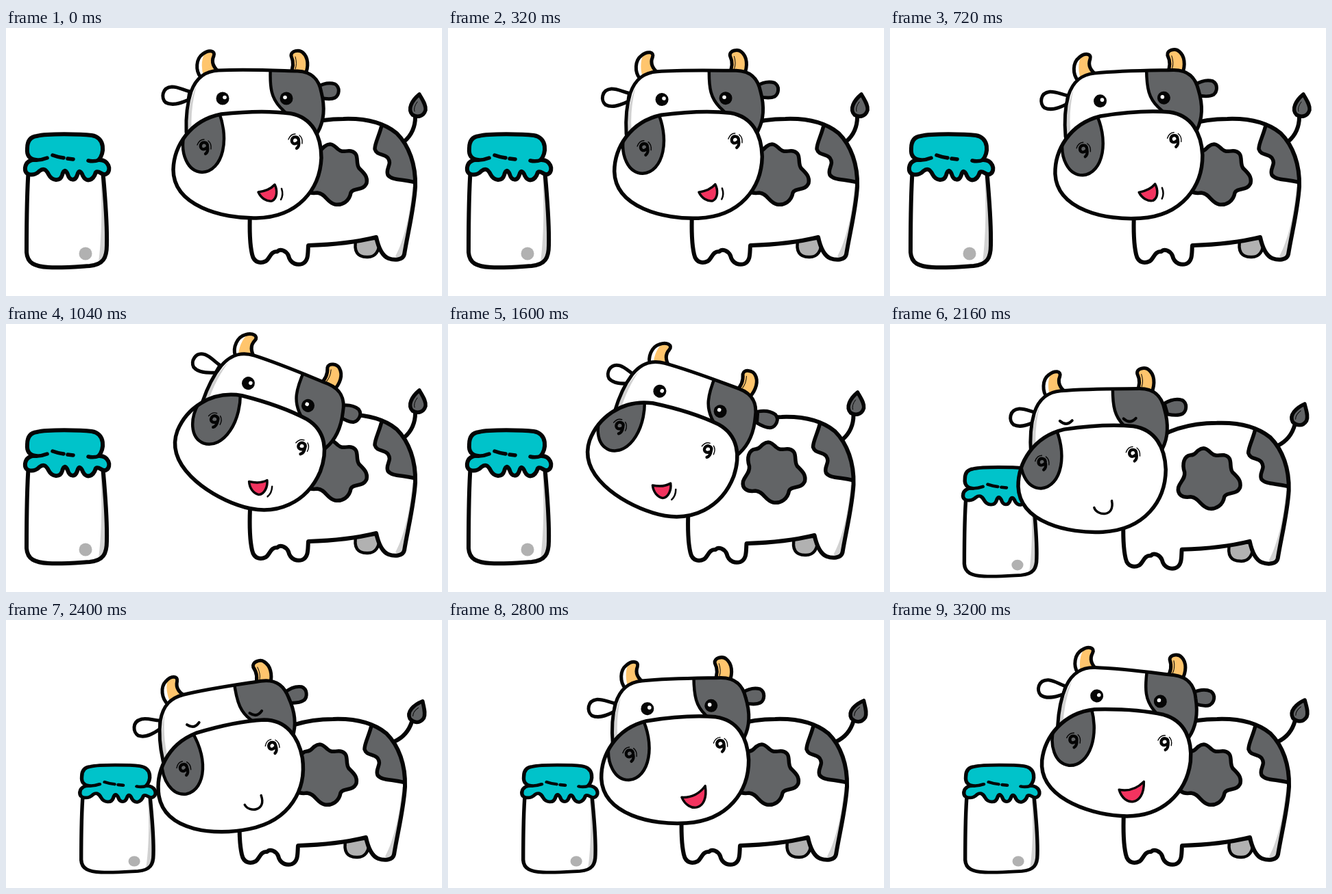
An HTML page with a canvas that plays this animation: 636x392 px, repeating every 3280 ms.

```html
<!DOCTYPE html>
<html lang="en">
<head>
<meta charset="utf-8">
<title>Cow and milk</title>
<style>
html, body { margin: 0; width: 100%; height: 100%; overflow: hidden; background: #fff }
canvas { display: block }
</style>
</head>
<body>
<canvas id="stage" width="636" height="392"></canvas>
<script>
const ctx = document.getElementById('stage').getContext('2d');
const INK = '#050505', DARK = '#626466', TEAL = '#00c3ca', HORN = '#ffc56d';
const SHADE = '#d2d2d2', PINK = '#f3335f', GREY = '#b1b1b1';
const LOOP = 3280, STEP = 80;

// time, skull x, y, muzzle x, y, angle, sideways turn
const headKeys = [
  [0, 362.5, 103, 355.5, 170, 0, 0],
  [720, 353, 104.5, 348.5, 171, -2.8, 2],
  [1040, 397, 103, 367.5, 160.5, 20.6, 0],
  [1600, 353, 113, 314.5, 167.5, 18.5, 10],
  [1920, 293.5, 130, 255, 187.5, 10.2, 16],
  [2400, 318, 140, 324, 201.5, -10.5, 2],
  [3200, 348, 115, 334, 178, 5, 2]
];
// time, x, y, tail angle
const bodyKeys = [
  [0, 0, 0, 0], [1440, 0, 0, 0], [1600, -5.5, 3, 0], [1920, -17, 10, 11.5],
  [2240, -15, 12, 16], [2400, -15, 12, 17.5], [3200, -15, 12, 15]
];
// time, left, top, x scale, y scale
const jarKeys = [
  [0, 27, 155, 1, 1], [1600, 27, 155, 1, 1],
  [1920, 91, 186, .92, .923], [2240, 107, 212, .9, .805], [3200, 107, 212, .9, .805]
];

// Monotone cubic interpolation between key rows
function sample(keys, t) {
  let i = 0;
  while (i < keys.length - 2 && t >= keys[i + 1][0]) i++;
  const a = keys[i], b = keys[i + 1], span = b[0] - a[0], u = (t - a[0]) / span;
  const slope = (k, c) => (keys[k + 1][c] - keys[k][c]) / (keys[k + 1][0] - keys[k][0]);
  const tangent = (k, c) => {
    if (k === 0 || k === keys.length - 1) return 0;
    const p = slope(k - 1, c), q = slope(k, c);
    return p * q > 0 ? 2 * p * q / (p + q) : 0;
  };
  return a.slice(1).map((v, n) => {
    const c = n + 1, d = b[c] - v;
    const m0 = tangent(i, c) * span, m1 = tangent(i + 1, c) * span;
    return v + u * (m0 + u * (3 * d - 2 * m0 - m1 + u * (m0 + m1 - 2 * d)));
  });
}

function shape(d, fill, width = 5, ink = INK) {
  const path = new Path2D(d);
  if (fill) { ctx.fillStyle = fill; ctx.fill(path); }
  if (width) { ctx.lineWidth = width; ctx.strokeStyle = ink; ctx.stroke(path); }
}

const line = (d, width) => shape(d, null, width);

// A filled outline whose markings stay inside it
function part(d, fill, width, markings) {
  shape(d, fill, 0);
  ctx.save();
  ctx.clip(new Path2D(d));
  markings();
  ctx.restore();
  line(d, width);
}

function dot(x, y, r, fill) {
  ctx.fillStyle = fill;
  ctx.beginPath();
  ctx.arc(x, y, r, 0, 7);
  ctx.fill();
}

function moved(x, y, draw) {
  ctx.save();
  ctx.translate(x, y);
  draw();
  ctx.restore();
}

function posed(x, y, degrees, px, py, draw) {
  moved(x, y, () => {
    ctx.rotate(degrees * Math.PI / 180);
    ctx.translate(-px, -py);
    draw();
  });
}

function jar([x, y, sx, sy]) {
  ctx.save();
  ctx.translate(x, y);
  ctx.scale(sx, sy);
  ctx.translate(-27, -155);
  part('M33 205C30 245 30 290 30 328C31 344 42 349 62 350C85 351 105 349 122 348C142 346 147 336 147 318C148 280 144 245 141 205Z',
    '#fff', 6, () => shape('M137 205C141 250 140 310 134 350L150 350L150 205Z', SHADE, 0));
  dot(116, 330, 9.5, GREY);
  shape('M45 158C60 154 110 155 125 157C145 160 144 184 135 193C150 192 154 208 147 213C141 218 136 207 131 211C127 224 117 226 112 216C109 208 106 208 104 215C101 224 93 224 90 214C87 207 84 207 82 215C79 225 67 224 62 214C58 206 54 205 49 209C42 217 26 217 28 204C29 196 36 192 44 193C34 192 30 186 31 176C31 165 36 159 45 158Z',
    TEAL, 6);
  line('M40 193Q50 194 60 190M68 186Q76 189 84 190M90 191L98 192M120 194Q128 196 136 193', 5.5);
  ctx.restore();
}

function body([x, y, tail]) {
  ctx.save();
  ctx.translate(x, y);
  posed(581, 166, tail, 581, 166, () => {
    line('M581 166Q597 152 597 130', 6);
    shape('M603 97C608 106 613 113 612 120C609 130 600 131 593 127C585 119 592 106 603 97Z', DARK, 5.5);
    line('M600 108Q594 116 596 122', 1);
  });
  shape('M511 308C506 328 514 335 526 335C538 336 546 327 545 308Z', GREY, 4.5);
  part('M356 270C355 295 356 318 359 331C362 345 373 344 379 341C385 337 386 326 396 327C400 322 409 326 412 333C415 346 426 347 432 345C442 341 440 328 441 318C475 317 508 314 540 306C543 320 548 333 558 337C566 340 579 340 581 331C586 300 595 265 597 232C598 200 588 172 570 154C548 136 520 132 492 133C455 133 420 142 390 165Z',
    '#fff', 6, () => {
      shape('M593 232C590 270 581 310 568 334L578 342L605 232Z', SHADE, 0);
      shape('M549 138C546 155 538 167 538 177C541 187 551 183 557 190C564 200 553 205 557 215C564 224 580 220 605 228L610 130Z', DARK, 5.5);
    });
  shape('M465 173C473 167 478 171 484 177C491 183 495 179 503 180C517 183 509 197 515 205C522 212 528 217 526 227C521 239 507 233 503 241C501 253 491 260 480 258C468 255 466 242 454 241C441 243 434 237 436 227C439 218 446 215 445 205C441 193 444 181 454 180C460 180 461 176 465 173Z', DARK, 5.5);
  ctx.restore();
}

function eye(x, shine, shut) {
  if (shut) return line(`M${x - 9} 106Q${x} 115 ${x + 9} 106`, 4);
  dot(x, 103, 9.5, INK);
  dot(x + shine, 101.5, 2.8, '#fff');
}

function hornsAndEars() {
  part('M284 72C276 62 277 45 287 38C296 31 306 33 303 41C299 50 302 58 313 66Z', HORN, 5,
    () => shape('M275 30L290 36Q282 52 289 74L275 74Z', '#fff', 0));
  shape('M414 68C420 58 420 50 416 41C415 33 428 31 433 36C441 43 442 56 436 70Z', HORN, 5);
  line('M422 42Q425 52 422 60', 1);
  shape('M268 93C257 90 251 86 242 86C227 87 226 103 233 109C242 114 253 111 266 105Z', '#fff', 5);
  shape('M454 86C463 81 471 79 480 82C488 87 486 98 480 102C474 105 467 104 458 102Z', DARK, 5);
}

function skull(shut, turn) {
  moved(turn * .7, 0, hornsAndEars);
  part('M263 152C262 125 266 105 270 93C278 71 292 63 310 62C350 60 390 62 425 63C449 64 457 78 460 94C465 114 465 134 455 152C448 165 438 174 425 178L285 178Q265 170 263 152Z',
    '#fff', 5, () => {
      shape('M261 160C264 125 270 100 278 84Q267 125 272 160Z', SHADE, 0);
      shape('M386 55C384 90 388 103 400 116C410 126 425 137 430 185L480 185L480 55Z', DARK, 4.5);
    });
  eye(316, 3, shut);
  eye(409, -2, shut);
}

function nostril(x, y) {
  moved(x, y, () => {
    line('M4 1C-2 6 -6 2 -5 -3C-3 -8 5 -8 5 -1C6 5 5 8 2 10', 4.3);
    line('M-10 -3Q-7 -11 0 -11M6 -9Q11 -5 10 3', 1.4);
  });
}

function mouth(mood) {
  if (mood === 'sip') line('M368 242C372 255 398 257 394 233', 3.5);
  else if (mood === 'happy') shape('M363 240Q384 242 398 225C402 262 372 264 363 240Z', PINK, 3.5);
  else {
    shape('M368 240Q384 238 392 229C396 237 396 249 388 253C380 254 372 249 368 240Z', PINK, 3.5);
    line('M402 235Q405 244 401 251', 2.5);
  }
}

// Turning slides the outline one way and the mouth the other
function muzzle(mood, turn) {
  moved(turn, 0, () => part('M244 207C245 173 268 135 314 126C350 122 385 121 415 125C447 131 460 158 460 190C458 236 426 277 365 278C315 279 244 260 244 207Z',
    '#fff', 5.5, () => {
      ctx.translate(-turn, 0);
      shape('M307 115C329 161 316 210 286 211C264 210 255 183 259 160L270 115Z', DARK, 4.5);
    }));
  nostril(289, 174);
  nostril(422, 166);
  moved(turn * -.6, 0, () => mouth(mood));
}

function draw(t) {
  ctx.fillStyle = '#fff';
  ctx.fillRect(0, 0, 636, 392);
  ctx.lineCap = ctx.lineJoin = 'round';
  const [sx, sy, mx, my, angle, turn] = sample(headKeys, t);
  const mood = t < 2160 ? 'open' : t < 2800 ? 'sip' : 'happy';
  jar(sample(jarKeys, t));
  body(sample(bodyKeys, t));
  posed(sx, sy, angle, 362.5, 103, () => skull(mood === 'sip', turn));
  posed(mx, my, angle, 355.5, 170, () => muzzle(mood, turn));
}

const start = performance.now();
function tick() {
  const t = (performance.now() - start) % LOOP;
  draw(Math.floor(t / STEP) * STEP);
  requestAnimationFrame(tick);
}
tick();
</script>
</body>
</html>
```
